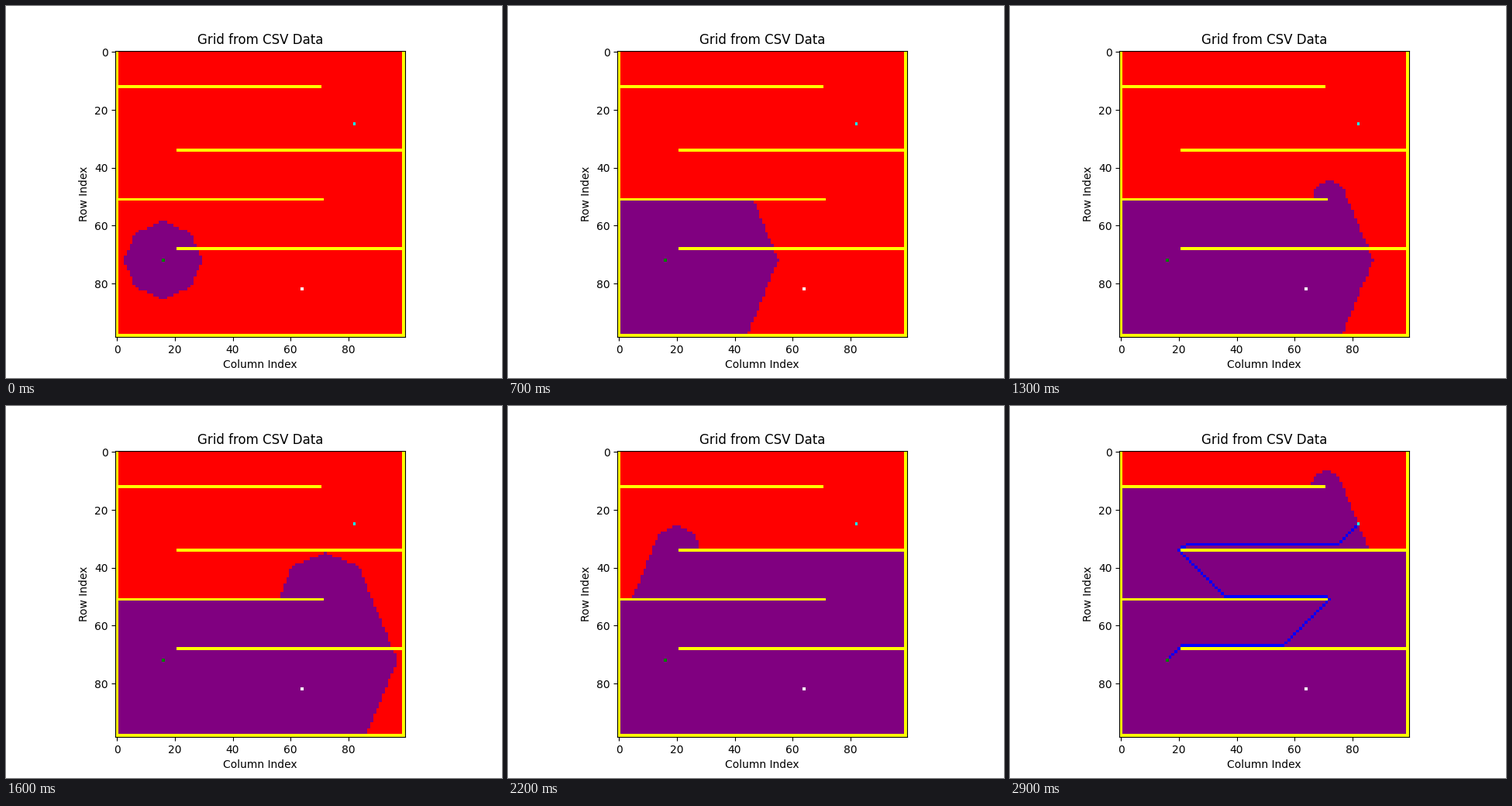
A matplotlib script that plays this animation: 640x480 px, repeating every 4030 ms.

```python
import itertools
import math

import matplotlib.pyplot as plt
import numpy as np
from matplotlib.animation import FuncAnimation
from matplotlib.colors import to_rgb

ROWS, COLS = 99, 100
START, GOAL, MARK = (72, 16), (25, 82), (82, 64)  # (row, column)
FIRST_COUNT, COUNT_STEP = 506, 250
STEP_MS, LAST_STEP = 100, 29
INTERVAL_MS, LOOP_MS = 10, 4030

# Corners of the shortest path as (row, column)
CORNERS = [START, (67, 21), (67, 56), (51, 72), (50, 71), (50, 36), (34, 20),
           (33, 21), (33, 22), (32, 23), (32, 75), GOAL]


def rgb(name):
    return np.array(to_rgb(name)) * 255


def make_walls():
    walls = np.zeros((ROWS, COLS), bool)
    walls[:, [0, -1]] = True
    walls[-1] = True
    walls[12, :71] = True
    walls[34, 21:] = True
    walls[51, :72] = True
    walls[68, 21:] = True
    return walls


def distances(walls):
    """Eight-way shortest distances; wrapped neighbours always meet a wall."""
    dist = np.full(walls.shape, np.inf)
    dist[START] = 0
    moves = [m for m in itertools.product((-1, 0, 1), repeat=2) if any(m)]
    while True:
        best = dist.copy()
        for move in moves:
            shifted = np.roll(dist, move, axis=(0, 1)) + math.hypot(*move)
            np.minimum(best, shifted, out=best)
        best[walls] = np.inf
        if np.array_equal(best, dist):
            return dist
        dist = best


def visit_ranks(dist):
    order = np.argsort(dist.round(6), axis=None, kind="stable")
    ranks = np.empty(dist.size, int)
    ranks[order] = np.arange(dist.size)
    return ranks.reshape(dist.shape)


def path_cells():
    for (r0, c0), (r1, c1) in zip(CORNERS, CORNERS[1:]):
        n = max(abs(r1 - r0), abs(c1 - c0))
        for k in range(n + 1):
            yield r0 + (r1 - r0) * k // n, c0 + (c1 - c0) * k // n


walls = make_walls()
ranks = visit_ranks(distances(walls))


def grid_image(step):
    done = step == LAST_STEP
    count = ranks[GOAL] if done else FIRST_COUNT + COUNT_STEP * step
    image = np.empty((ROWS, COLS, 3), np.uint8)
    image[:] = rgb("red")
    image[ranks < count] = rgb("purple")
    image[walls] = rgb("yellow")
    if done:
        for cell in path_cells():
            image[cell] = rgb("blue")
    for cell, color in ((START, "green"), (GOAL, "cyan"), (MARK, "white")):
        image[cell] = rgb(color)
    return image


images = [grid_image(step) for step in range(LAST_STEP + 1)]

fig, ax = plt.subplots(figsize=(6.4, 4.8), dpi=100)
picture = ax.imshow(images[0], interpolation="nearest")
ax.set_title("Grid from CSV Data")
ax.set_xlabel("Column Index")
ax.set_ylabel("Row Index")


def update(frame):
    step = min(frame * INTERVAL_MS // STEP_MS, LAST_STEP)
    picture.set_data(images[step])
    return [picture]


animation = FuncAnimation(fig, update, frames=LOOP_MS // INTERVAL_MS,
                          interval=INTERVAL_MS, repeat=True, repeat_delay=0)
plt.show()
```
